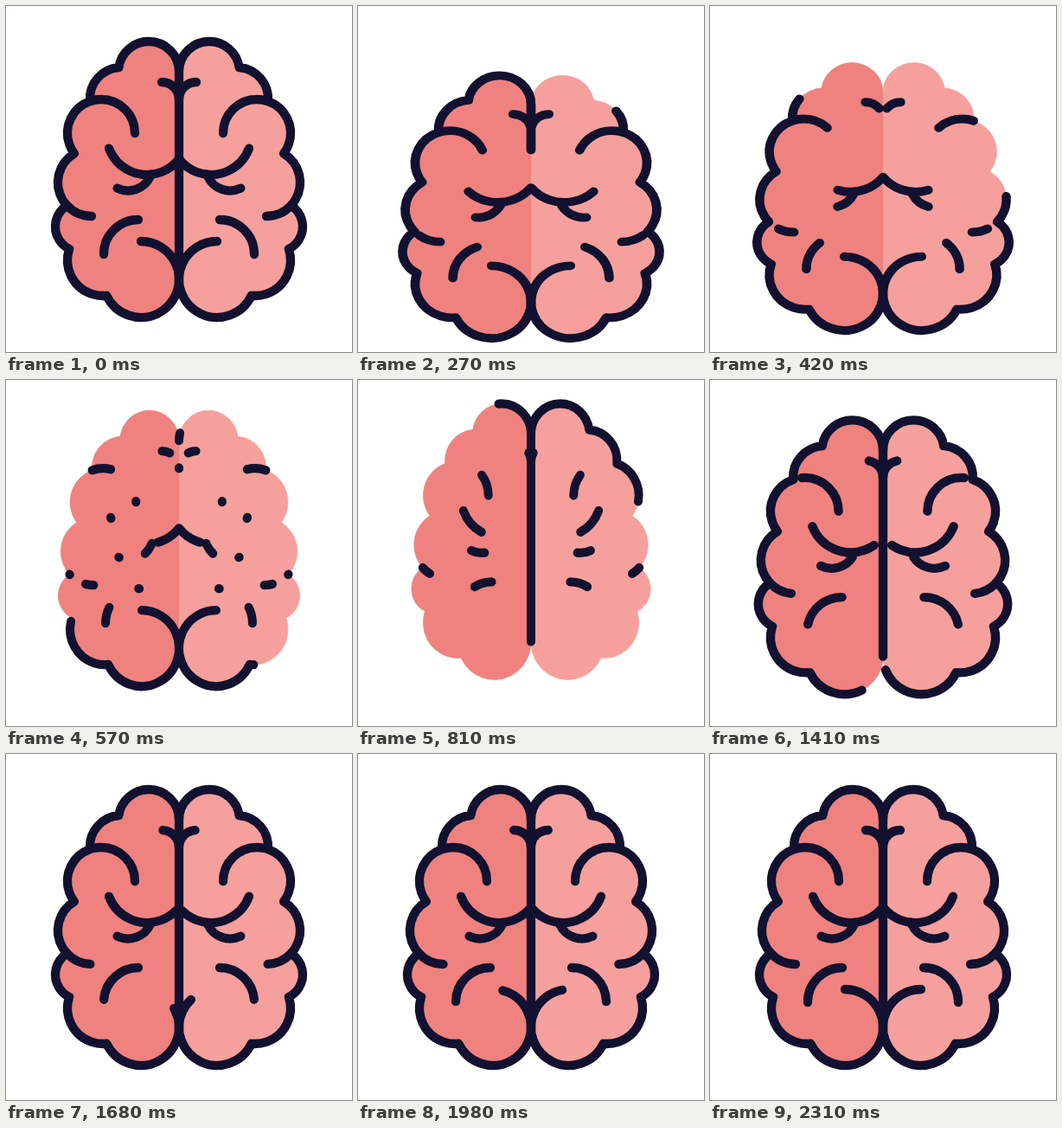
Animation, 400 px wide and 400 px high, one loop 2.4 s. Source, as an HTML page with a canvas:

```html
<!DOCTYPE html>
<html lang="en">
<head>
<meta charset="utf-8">
<title>Brain</title>
<style>
html, body { margin: 0; width: 100%; height: 100%; overflow: hidden; background: #fff; }
canvas { display: block; width: 100%; height: 100%; }
</style>
</head>
<body>
<canvas id="stage" width="400" height="400"></canvas>
<script>
const ctx = document.getElementById('stage').getContext('2d');
const LOOP = 2400, STEP = 30, TURN = 2 * Math.PI;
const INK = '#12112f', LEFT_FILL = '#ef827e', RIGHT_FILL = '#f5a09c';
const UP = -TURN / 4, DOWN = TURN / 4, LEFT = TURN / 2, RIGHT = 0;

const circle = (x, y, r) => ({ x, y, r });
const arc = (shape, from, to) => ({ ...shape, from, to });
const angleTo = (c, p) => Math.atan2(p.y - c.y, p.x - c.x);

// Lobes of the left half, from the top round to the bottom.
const lobes = [
  circle(165, 76, 35),
  circle(133, 107, 36),
  circle(110, 147, 39),
  circle(99, 204, 39),
  circle(86, 255, 29),
  circle(112, 294, 41),
  circle(156, 316, 44)
];

// Outer crossing point of two neighbouring lobes.
function joint(a, b) {
  const dx = b.x - a.x, dy = b.y - a.y, d = Math.hypot(dx, dy);
  const along = (d * d + a.r * a.r - b.r * b.r) / (2 * d);
  const across = Math.sqrt(a.r * a.r - along * along);
  return { x: a.x + (dx * along - dy * across) / d, y: a.y + (dy * along + dx * across) / d };
}

const contour = end => lobes.map((lobe, i) => arc(
  lobe,
  i ? angleTo(lobe, joint(lobes[i - 1], lobe)) : RIGHT,
  i < lobes.length - 1 ? angleTo(lobe, joint(lobe, lobes[i + 1])) : end
));

// Joins counterclockwise arcs into one path and measures its length.
function chain(arcs, stem = 0) {
  const path = new Path2D();
  let length = stem;
  if (stem) path.moveTo(200, arcs[0].y + stem);
  for (const { x, y, r, from, to } of arcs) {
    path.arc(x, y, r, from, to, true);
    length += r * ((from - to + 2 * TURN) % TURN);
  }
  return { path, length };
}

const outline = contour(UP);
const folds = [
  arc(circle(163, 148, 47), 2.78, 0.68),
  arc(lobes[2], RIGHT, outline[2].from),
  arc(circle(141, 185, 28.5), 2.02, 0.35),
  arc(circle(153, 287, 40), UP, LEFT),
  arc(lobes[3], outline[3].to, DOWN),
  arc(circle(180, 108, 20), RIGHT, UP)
].map(fold => chain([fold]));
const leftLines = [chain(outline, 240), ...folds];
const rightLines = [chain(outline), ...folds];
const half = chain(contour(RIGHT)).path;

// Turning points of the bounce, eased between.
const BOUNCE = [
  { time: 0, shift: 0, width: 1 },
  { time: 285, shift: 32, width: 1.039 },
  { time: 705, shift: -18, width: 0.956 },
  { time: 1130, shift: 11, width: 1.021 },
  { time: 1620, shift: 0, width: 1 },
  { time: LOOP, shift: 0, width: 1 }
];

function pose(t) {
  const i = BOUNCE.findIndex(p => p.time > t);
  const a = BOUNCE[i - 1], b = BOUNCE[i];
  const x = (t - a.time) / (b.time - a.time), ease = x * x * (3 - 2 * x);
  const mix = key => a[key] + (b[key] - a[key]) * ease;
  const shift = mix('shift');
  return { shift, width: mix('width'), height: 1 - 0.0015 * Math.max(0, shift) };
}

const erased = t => Math.min(1, (t / 715) ** 1.6);
const drawn = t => Math.min(1, 1.01 * Math.tanh((Math.max(0, t - 558) / 676) ** 1.06));

function strokePart({ path, length }, from, to) {
  if (to <= from) return;
  ctx.setLineDash([(to - from) * length, length * 2]);
  ctx.lineDashOffset = -from * length;
  ctx.stroke(path);
}

function mirrored(paint) {
  ctx.save();
  ctx.translate(400, 0);
  ctx.scale(-1, 1);
  paint();
  ctx.restore();
}

function fillHalf(color) {
  ctx.fillStyle = ctx.strokeStyle = color;
  ctx.lineWidth = 0.8;
  ctx.setLineDash([]);
  ctx.fill(half);
  ctx.stroke(half);
}

function render(t) {
  const { shift, width, height } = pose(t);
  ctx.setTransform(1, 0, 0, 1, 0, 0);
  ctx.fillStyle = '#fff';
  ctx.fillRect(0, 0, 400, 400);
  ctx.translate(200, 200 + shift);
  ctx.scale(width, height);
  ctx.translate(-200, -200);

  fillHalf(LEFT_FILL);
  mirrored(() => fillHalf(RIGHT_FILL));

  ctx.strokeStyle = INK;
  ctx.lineWidth = 10.3;
  ctx.lineCap = ctx.lineJoin = 'round';
  const strokeLines = lines => lines.forEach(line => {
    strokePart(line, erased(t), 1);
    strokePart(line, 0, drawn(t));
  });
  strokeLines(leftLines);
  mirrored(() => strokeLines(rightLines));
}

function tick() {
  const t = performance.now() % LOOP;
  render(Math.floor(t / STEP) * STEP);
  requestAnimationFrame(tick);
}
tick();
</script>
</body>
</html>
```
